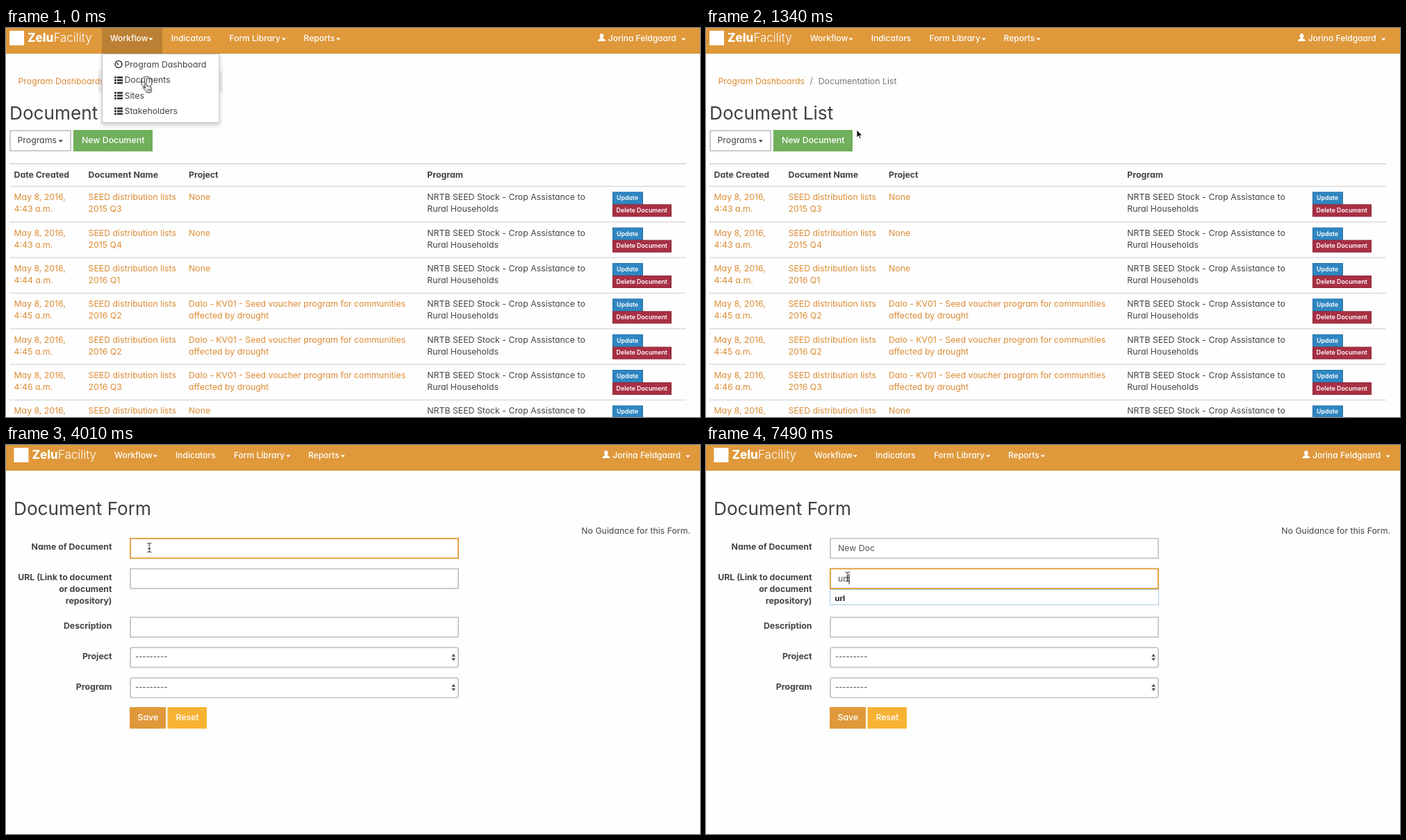
An HTML page for the animation above (8 s loop, 999 by 561 pixels).

```html
<!DOCTYPE html>
<html lang="en">
<head>
<meta charset="utf-8">
<title>Document list and form</title>
<style>
  html, body { margin: 0; width: 100%; height: 100%; overflow: hidden; background: #fefefe; }
  svg {
    display: block; width: 999px; height: 561px; fill: #444;
    font: 12.3px Inter, sans-serif; font-feature-settings: "cv11";
  }
  .title { font-size: 26.2px; fill: #404040; }
  .bold { font-weight: 700; }
  .end { text-anchor: end; }
  .link { fill: #dc8c35; }
  .muted { fill: #777; }
  .white { fill: #fff; }
  .medium { font-weight: 500; }
  .nav { fill: #fff; font-size: 12px; font-weight: 500; }
  .plain { font: 12px "Liberation Sans", sans-serif; stroke: #fff; stroke-width: .35px; }
  .brand { font: 400 17px Inter, sans-serif; fill: #fff; }
  .heavy { font-weight: 800; }
  .light { font-weight: 300; }
  .small { font-size: 8.8px; font-weight: 600; fill: #fff; }
  .dash { font-size: 11.2px; }
  .typed { fill: #555; }
  .hint { font: 700 11.4px "Liberation Sans", sans-serif; fill: #111; }
  .field { fill: #fff; stroke: #c6c6c6; stroke-width: 1.8px; }
  .menu { fill: #fff; stroke: #c4c4c4; filter: drop-shadow(0 3px 3px #0003); }
  .hand, .arrow { fill: #fff; stroke: #111; stroke-linejoin: round; }
  .arrow { fill: #111; stroke: #fff; stroke-width: .8px; }
  .beam { fill: none; stroke: #222; }
</style>
</head>
<body>
<svg id="stage" viewBox="0 0 999 561"></svg>
<script>
const LOOP = 8000;
const ORANGE = '#df983a';
const GREY = '#c6c6c6';
const SANS = '"Liberation Sans", sans-serif';
const $ = id => document.getElementById(id);

// Drawing helpers
const text = (x, y, s, cls = '') => `<text x="${x}" y="${y}" class="${cls}">${s}</text>`;
const rect = (x, y, w, h, fill, more = '') =>
  `<rect x="${x}" y="${y}" width="${w}" height="${h}" fill="${fill}" ${more}/>`;
const caret = (x, y) => `<path d="M${x} ${y}h6.4l-3.2 3.4z"/>`;
const group = (id, ...parts) => `<g id="${id}">${parts.join('')}</g>`;
const move = (x, y) => `translate(${x}px, ${y}px)`;

const brand = x => rect(x, 4, 21, 21, '#fff') +
  text(x + 26, 20, '<tspan class="heavy">Zelu</tspan><tspan class="light">Facility</tspan>', 'brand');

const person = (x, y) =>
  `<ellipse cx="${x + 5.5}" cy="${y + 3.5}" rx="2.8" ry="3.5"/>` +
  `<path d="M${x} ${y + 11}q0-3 4-4h3q4 1 4 4z"/>`;

const nav = dx => `<g class="nav" transform="translate(${dx} 0)">` + brand(5) +
  text(149.7, 19, 'Workflow') + caret(205.3, 14.4) +
  text(237.7, 19, 'Indicators') +
  text(321.5, 19, 'Form Library') + caret(396.7, 14.4) +
  text(428.6, 19, 'Reports') + caret(475.2, 14.4) +
  person(852, 8) + text(866.8, 19, 'Jorina Feldgaard') + caret(972, 14.8) + '</g>';

const plainNav = () => brand(11) + '<g class="nav plain">' +
  text(156, 19.5, 'Workflow') + caret(207, 14.8) +
  text(239, 19.5, 'Indicators') +
  text(317, 19.5, 'Form Library') + caret(386.6, 14.8) + '</g>';

function row(y, time, list, linked) {
  const project = linked
    ? ['Dalo - KV01 - Seed voucher program for communities', 'affected by drought']
    : ['None', ''];
  const cells = [
    [11.5, 'May 8, 2016,', `${time} a.m.`, 'link'],
    [118.5, 'SEED distribution lists', list, 'link'],
    [263, ...project, 'link'],
    [606.3, 'NRTB SEED Stock - Crop Assistance to', 'Rural Households', '']
  ];
  return rect(5, y - .6, 974, 1.4, '#d9d9d9') +
    cells.map(([x, a, b, cls]) => text(x, y + 20, a, cls) + text(x, y + 37, b, cls)).join('') +
    rect(873.5, y + 8.5, 43, 17.5, '#2f86c1', 'stroke="#2672a8"') + text(879, y + 20, 'Update', 'small') +
    rect(873.5, y + 26.5, 84, 17, '#a83043', 'stroke="#8f2638"') + text(878.6, y + 37.6, 'Delete Document', 'small');
}

const ROWS = [
  ['4:43', '2015 Q3'], ['4:43', '2015 Q4'], ['4:44', '2016 Q1'], ['4:45', '2016 Q2', true],
  ['4:45', '2016 Q2', true], ['4:46', '2016 Q3', true], ['4:46', '2016 Q4']
];

const listIcon = (x, y) => [0, 4, 8].map(d =>
  rect(x, y + d, 3, 2.7, '#333') + rect(x + 4, y + d, 8, 2.7, '#333')).join('');

const menu = () => rect(138, 0, 87, 37, '#bb8033') +
  `<g class="nav">${text(149.7, 19, 'Workflow')}${caret(205.3, 14.4)}</g>` +
  rect(133, 62, 179, 31, '#8882') +
  '<rect class="menu" x="138.5" y="37.5" width="168.5" height="99"/>' +
  '<circle cx="162" cy="52.3" r="5" fill="none" stroke="#333" stroke-width="1.5"/>' +
  '<path d="M162 53.5l-2.5-3.5" stroke="#333" stroke-width="1.3"/>' +
  ['Program Dashboard', 'Documents', 'Sites', 'Stakeholders'].map((s, i) =>
    (i ? listIcon(156, 47.6 + i * 22.3) : '') + text(170.5, 57 + i * 22.3, s)).join('');

const listPage = () => nav(0) +
  text(17.5, 81, 'Program Dashboards', 'link') + text(149.5, 81, '/', 'muted') +
  text(161.7, 81, 'Documentation List', 'muted') +
  text(5, 131.5, 'Document List', 'title') +
  '<rect class="field" x="6" y="148" width="87" height="29"/>' + text(16.5, 166, 'Programs') + caret(75.6, 161.6) +
  rect(97, 147, 114, 31, '#70af5b', 'id="create"') + text(109, 166, 'New Document', 'white medium') +
  rect(5, 195, 974, 1.6, '#d4d4d4') +
  [[11.5, 'Date Created'], [118.5, 'Document Name'], [263, 'Project'], [606.3, 'Program']]
    .map(([x, s]) => text(x, 215.5, s, 'bold')).join('') +
  ROWS.map((r, i) => row(228.3 + i * 51.35, ...r)).join('');

const field = (id, y, r = 0) =>
  `<rect id="${id}" class="field" x="179" y="${y}" width="472" height="28.5" rx="${r}"/>`;

const select = (id, y) => field(id, y, 3) + text(186, y + 17, '---------', 'dash') +
  `<path d="M641.3 ${y + 13}l2.9-4.3 2.9 4.3zM641.3 ${y + 15}l2.9 4.3 2.9-4.3z" fill="#555"/>`;

const hints = (id, y, words) => group(id,
  rect(178.5, y, 473, words.length * 21.5 + .5, '#fff', 'stroke="#a9c9de"'),
  ...words.map((s, i) => text(185.5, y + 16 + i * 21.3, s, 'hint')));

const formPage = () =>
  text(11, 100.5, 'Document Form', 'title') + text(985, 128, 'No Guidance for this Form.', 'end') +
  [['Name of Document', 151], ['URL (Link to document', 195], ['or document', 212], ['repository)', 229],
   ['Description', 265], ['Project', 308.5], ['Program', 352.5]]
    .map(([s, y]) => text(152.5, y, s, 'bold end')).join('') +
  field('name', 134.8) + field('url', 178.4) + field('about', 248.5) +
  select('project', 292.2) + select('program', 335.8) +
  rect(178, 378, 52, 31, ORANGE) + text(189.5, 397, 'Save', 'white medium') +
  rect(232.5, 378, 56.5, 31, '#f8b335') + text(244.5, 397, 'Reset', 'white medium') +
  hints('nameHints', 164.5, ['New Document', 'New Report']) + hints('urlHints', 208.5, ['url']);

const hand = `<path d="M4.2 8.6L2.9 3Q2.6 1.2 3.9.9 5.1.7 5.5 2.2L6.5 5.6Q7.6 4.8 8.4 5.8 9.5 5 10.3 6.1
  11.6 5.5 12.3 7 13.4 9.6 12.6 11.6L11.8 14.5H6.2L5.2 12.6Q3.6 11 1.2 8.6.4 7.4 1.6 6.9 2.8 6.9 4.2 8.6z"/>
  <path d="M7.3 9.3v3M9.1 9.3v3M10.9 9.3v3" stroke-width=".8"/>`;
const beam = '<path d="M-3-6.7Q0-6.7 0-5V5Q0 6.7-3 6.7M3-6.7Q0-6.7 0-5M0 5Q0 6.7 3 6.7M-2 1.5H2"/>';

// Typed text at each moment
const NAME = [[4280, 'N'], [4550, 'Ne'], [4810, 'New'], [5080, 'New Do'], [5350, 'New Doc']];
const URL_TEXT = [[7220, 'u'], [7490, 'url']];
const typed = (id, y, marks) => marks.map(([, s], i) => `<text id="${id}${i}" class="typed" x="190" y="${y}">${s}</text>`).join('');

$('stage').innerHTML =
  rect(0, 0, 999, 37, ORANGE) + rect(0, 36, 999, 1, '#d5913a') +
  group('list', listPage()) + group('menu', menu()) +
  group('plain', plainNav()) +
  group('extra', '<g class="nav plain">', text(418, 19.5, 'Reports'), caret(463, 14.8),
    person(868, 8), text(973, 19.5, 'Jorina Feldgaard', 'end'), caret(978.4, 14.8), '</g>') +
  group('formNav', nav(6.4)) +
  group('form', formPage(), typed('n', 153, NAME), typed('u', 196.8, URL_TEXT),
    rect(0, 0, 1, 15, '#222', 'id="caret"')) +
  '<circle id="ring" cx="202.3" cy="78" r="8" fill="none" stroke="#333"/>' +
  `<g id="hand" class="hand">${hand}</g><g id="beam" class="beam">${beam}</g>` +
  '<path id="arrow" class="arrow" transform="translate(217 147)" d="M0 0V11L2.6 8.6 4.3 12.4 6 11.7 4.4 8H8z"/>';

// Hard steps: each mark is [ms, value]
function steps(id, prop, marks) {
  $(id).animate(
    marks.map(([ms, v]) => ({ offset: ms / LOOP, [prop]: v, easing: 'step-end' })),
    { duration: LOOP, iterations: Infinity });
}
function show(id, ...spans) {
  const marks = spans.flatMap(([from, to]) => [[from, 1], [to, 0]]);
  if (spans[0][0] > 0) marks.unshift([0, 0]);
  steps(id, 'opacity', marks);
}

// Caret follows the measured text
const ends = (id, y, marks) => marks.map(([ms], i) => [ms, move(190.5 + $(id + i).getComputedTextLength(), y)]);
const caretPath = [[0, move(190, 142)], ...ends('n', 142, NAME), [6420, move(190, 186)], ...ends('u', 186, URL_TEXT)];
steps('caret', 'transform', caretPath);
show('caret', [3740, 4010], [4280, 5880], [6680, 6950], [7220, LOOP]);

for (const [id, marks] of [['n', NAME], ['u', URL_TEXT]])
  marks.forEach(([ms], i) => show(id + i, [ms, marks[i + 1]?.[0] ?? LOOP]));

show('list', [0, 1070], [1340, 2680]);
show('menu', [0, 270]);
show('ring', [0, 270]);
show('plain', [1070, 1340], [2680, 3210]);
show('extra', [2950, 3210]);
show('formNav', [3210, LOOP]);
show('form', [2950, LOOP]);
steps('form', 'fontFamily', [[0, SANS], [3210, 'Inter, sans-serif']]);
show('nameHints', [4280, 5080]);
show('urlHints', [7220, LOOP]);

steps('create', 'fill', [[0, '#70af5b'], [1610, '#65a251'], [1880, '#5c9848'], [2140, '#579243'], [2410, '#4e873b']]);
steps('name', 'stroke', [[0, GREY], [3480, '#d5ad76'], [3740, ORANGE], [6420, '#d2b081'], [6680, GREY]]);
steps('url', 'stroke', [[0, GREY], [6420, '#d5ad76'], [6680, ORANGE]]);

show('hand', [0, 270], [1610, 3210]);
steps('hand', 'transform', [[0, move(196.5, 78.5)], [1610, move(187, 154)], [1880, move(170, 157)], [2140, move(160.8, 158.8)]]);
show('beam', [270, 1340], [3210, LOOP]);
steps('beam', 'transform', [[0, move(201, 81)], [3210, move(206.3, 148)], [5880, move(206.3, 168.5)],
  [6150, move(204.5, 184)], [6420, move(203.7, 190)]]);
show('arrow', [1340, 1610]);
</script>
</body>
</html>
```
